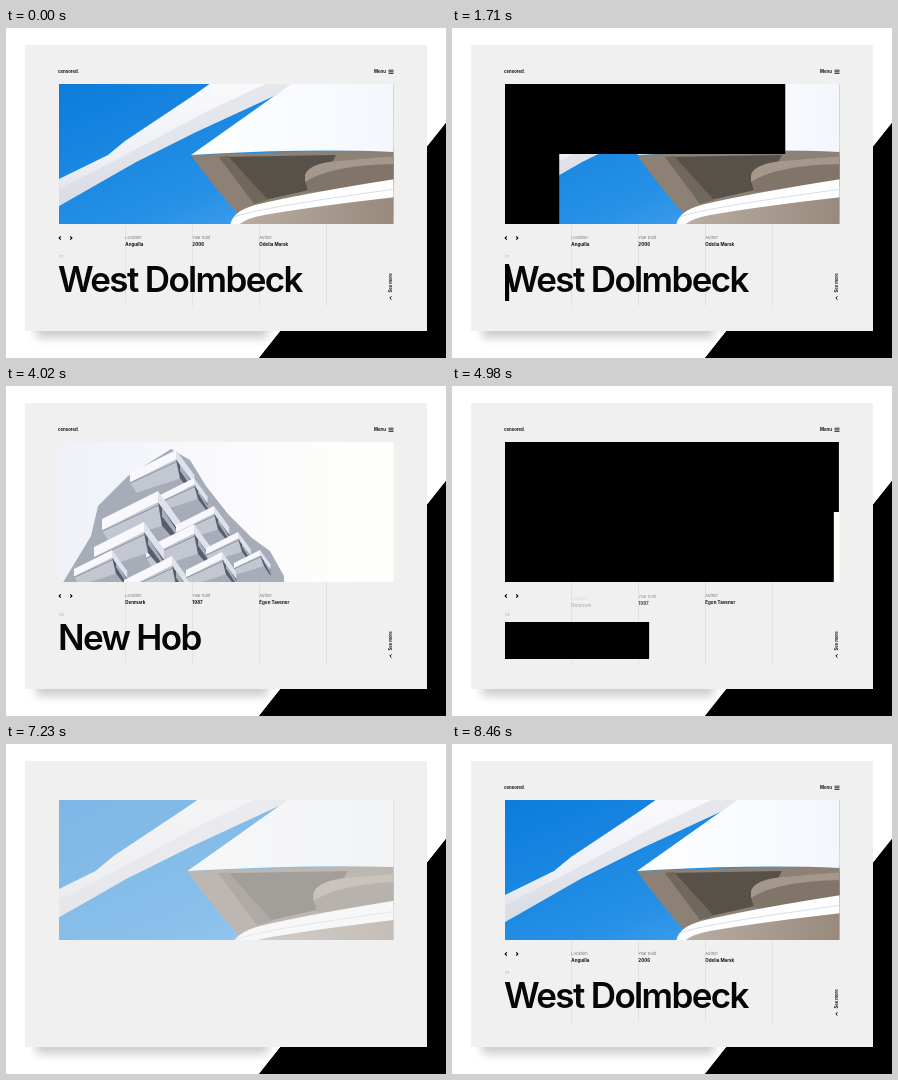
Animation, 440 px wide and 330 px high, one loop 8.49 s. Source, as an HTML page:

```html
<!DOCTYPE html>
<html lang="en">
<head>
<meta charset="utf-8">
<style>
  html, body { margin: 0; width: 100%; height: 100%; overflow: hidden; background: #fff; }
  svg { display: block; width: 440px; height: 330px; font-family: Inter, "Liberation Sans", sans-serif; }
  .title { font-size: 35px; font-weight: 600; letter-spacing: -1.65px; fill: #070707; }
  .strong { font-size: 4.5px; font-weight: 700; fill: #111; }
  .label { font-size: 4px; fill: #777; }
</style>
</head>
<body>
<svg viewBox="0 0 440 330">
  <defs>
    <linearGradient id="sky" x1="0" x2="1" y1="0" y2="1">
      <stop stop-color="#0c7cdb"/><stop offset=".6" stop-color="#2590e6"/><stop offset="1" stop-color="#58aaf0"/>
    </linearGradient>
    <linearGradient id="beam" x1="0" x2=".25" y1="0" y2="1">
      <stop stop-color="#fff"/><stop offset=".6" stop-color="#eff0f5"/><stop offset="1" stop-color="#d3d6df"/>
    </linearGradient>
    <linearGradient id="roof" x1="0" x2="1">
      <stop stop-color="#fff"/><stop offset="1" stop-color="#f3f7fd"/>
    </linearGradient>
    <linearGradient id="concrete" x1="0" x2="1">
      <stop stop-color="#b9aea3"/><stop offset="1" stop-color="#98897c"/>
    </linearGradient>
    <linearGradient id="haze" x1="0" x2="1">
      <stop stop-color="#eff1f8"/><stop offset=".5" stop-color="#fafafd"/><stop offset="1" stop-color="#fffffa"/>
    </linearGradient>
    <linearGradient id="pale" x1="0" x2="1" y1="0" y2="1">
      <stop stop-color="#b9dbef"/><stop offset="1" stop-color="#dbedf6"/>
    </linearGradient>
    <linearGradient id="shell" x1="0" x2="1">
      <stop stop-color="#c7d3df"/><stop offset=".5" stop-color="#e6eaf0"/><stop offset="1" stop-color="#eef1f4"/>
    </linearGradient>
    <filter id="blur" x="-10%" y="-10%" width="120%" height="120%"><feGaussianBlur stdDeviation="5"/></filter>
    <clipPath id="clipTop"><rect x="53" y="56" width="334.5" height="70"/></clipPath>
    <clipPath id="clipBottom"><rect x="53" y="126" width="334.5" height="70"/></clipPath>

    <g id="photo0">
      <rect x="53" y="56" width="335" height="140" fill="url(#sky)"/>
      <path d="M30 162L53 151 102 127 119 113 188 67 212 50H296L268 68 190 104 130 134 53 178 30 190Z" fill="url(#beam)"/>
      <path d="M53 161L108 133 200 84 272 50H296L268 68 190 104 130 134 53 178Z" fill="#d8dbe4" opacity=".55"/>
      <path d="M185 127L390 121V190H236Q208 160 185 127Z" fill="#8d8074"/>
      <path d="M213 129L330 127 312 160 250 174Z" fill="#575149"/>
      <path d="M213 129L222 128 262 172 248 176Z" fill="#70675d"/>
      <path d="M299 152Q299 136 330 133L390 128V158L302 164Z" fill="#81756a"/>
      <path d="M299 147Q302 136 330 133L390 128V136Q325 137 299 154Z" fill="#a4988d"/>
      <path d="M185 127L288 54H390V124Q300 120 185 127Z" fill="url(#roof)"/>
      <path d="M224 200Q224 184 249 177 300 165 390 151V200Z" fill="#fff"/>
      <path d="M230 200Q236 191 258 187 310 178 390 169V200Z" fill="url(#concrete)"/>
      <path d="M228 189Q250 180 390 161" fill="none" stroke="#d9dde4" stroke-width="1"/>
    </g>
    <g id="photo1">
      <rect x="53" y="56" width="335" height="140" fill="url(#haze)"/>
      <path d="M56 198L85 150 92 120 122 90 165 63 184 74 200 100 222 128 246 152 264 165 278 190V198Z" fill="#a7acb9"/>
      <g id="tower"></g>
    </g>
    <g id="photo2">
      <rect x="53" y="56" width="335" height="140" fill="url(#pale)"/>
      <ellipse cx="145" cy="225" rx="148" ry="131" fill="url(#shell)"/>
      <g id="dome"></g>
    </g>
  </defs>

  <path d="M440 95V330H253Z"/>
  <g>
    <path d="M0 303H274L253 330H0Z" fill="#fff"/>
    <rect x="30" y="40" width="232" height="270" fill="#000" opacity=".2" filter="url(#blur)"/>
    <path d="M440 95V330H253Z"/>
  </g>
  <rect x="0" y="0" width="19" height="330" fill="#fff"/>
  <rect x="19" y="17" width="402" height="286" fill="#f0f0f0"/>

  <g id="photo">
    <g clip-path="url(#clipTop)"><use id="top"/></g>
    <g clip-path="url(#clipBottom)"><use id="bottom"/></g>
  </g>
  <g id="grid"><path d="M119.5 196V278M186.5 196V278M253.5 196V278M320.5 196V278" stroke="#e2e2e2"/></g>
  <g id="header">
    <text class="strong" x="52" y="45" style="font-size:4.3px">censored.</text>
    <text class="strong" x="368" y="45" style="font-size:4.3px">Menu</text>
    <path d="M382.5 42.2h5M382.5 43.8h5M382.5 45.4h5" stroke="#222" stroke-width=".9"/>
  </g>
  <g id="nav"><path d="M54.8 208.3l-1.7 1.7 1.7 1.7M64.2 208.3l1.7 1.7-1.7 1.7" fill="none" stroke="#000" stroke-width="1.1"/></g>
  <g id="more">
    <text class="strong" transform="translate(386 264.5) rotate(-90)" style="font-size:4.2px">See more</text>
    <path d="M385.5 268.3l-1.7 1.7 1.7 1.7" fill="none" stroke="#000"/>
  </g>
  <g id="meta"></g>
  <text id="number" class="label" x="53" y="230" style="fill:#aaa"></text>
  <text id="title" class="title" x="52" y="263.5"></text>
  <rect id="topBlock" y="56" height="70"/>
  <rect id="bottomBlock" y="126" height="70"/>
  <rect id="titleBlock" y="236" height="37"/>
</svg>
<script>
const LOOP = 8490, SHIFT = 3010, WIPE = 800, BLANK = 7000, INTRO = 7110;
const slides = [
  { title: "West Dolmbeck", meta: ["Anguilla", "2006", "Odelia Marsk"] },
  { title: "New Hob", meta: ["Denmark", "1987", "Egon Tavener"] },
  { title: "West Tilby", meta: ["Saint Martin", "2001", "Walter Dunsby"] }
];
const blockWidths = [243, 172];
const $ = id => document.getElementById(id);
const clamp = x => Math.min(1, Math.max(0, x));
const out = x => 1 - (1 - clamp(x)) ** 2;
const smooth = x => { x = clamp(x); return x * x * (3 - 2 * x); };
const expo = x => x <= 0 ? 0 : x >= 1 ? 1 : x < .5 ? 2 ** (20 * x - 10) / 2 : 1 - 2 ** (10 - 20 * x) / 2;

function poly(points, fill) {
  return `<polygon points="${points.map(p => p.join()).join(" ")}" fill="${fill}"/>`;
}

// A cantilevered balcony seen from below, with its near corner at x, y.
function balcony([x, y, w]) {
  const left = [x - w, y + w * .5], right = [x + w * .4, y + w * .55], h = w * .2;
  const down = ([px, py], d) => [px, py + d];
  const near = [x, y];
  return poly([down(left, h), down(near, h), [x + 4, y + w * .62], [x - w * .86, y + w * .93]], "#c3c7d1")
    + poly([down(near, h), down(right, h), down(right, h * 2.2), [x + 4, y + w * .62]], "#565d6d")
    + poly([[x + 4, y + w * .3], down(right, h * 1.3), down(right, h * 1.7), [x + 4, y + w * .45]], "#a9b0bd")
    + poly([left, near, down(near, h), down(left, h)], "#f8f8fc")
    + poly([near, right, down(right, h), down(near, h)], "#dfe2ea")
    + `<path d="M${x - w} ${y + w * .72}L${x + 2} ${y + w * .24}" stroke="#7d8494" stroke-width=".8"/>`;
}
$("tower").innerHTML = [
  [170, 64, 46], [188, 92, 34], [152, 105, 56], [208, 120, 38], [188, 138, 48],
  [138, 136, 50], [232, 146, 32], [106, 164, 38], [166, 170, 48], [216, 166, 36], [254, 164, 26]
].map(balcony).join("");

function onDome(lon, lat) {
  return [145 + 148 * Math.cos(lat) * Math.sin(lon), 225 - 131 * Math.sin(lat)];
}
function drawDome() {
  const step = .36, rise = .24;
  let lines = "", holes = "";
  for (let c = -9; c <= 9; c++) {
    for (const side of [-1, 1]) {
      let pen = "M";
      for (let lat = .1; lat < 1.2; lat += .06) {
        const lon = c * step + side * lat * step / 2 / rise;
        if (Math.abs(lon) > 1.5) { pen = "M"; continue; }
        lines += pen + onDome(lon, lat).map(n => n.toFixed(1));
        pen = "L";
      }
    }
    for (let k = 1; k < 5; k++) {
      const lat = k * rise, lon = (c + .5 + k / 2) * step;
      if (Math.abs(lon) > 1.4) continue;
      const [x, y] = onDome(lon, lat);
      const rx = 13.5 * Math.cos(lon) * Math.sqrt(Math.cos(lat)), ry = 11 * Math.sqrt(Math.cos(lat));
      holes += `<ellipse cx="${x}" cy="${y}" rx="${rx}" ry="${ry}" fill="#f5f7f9" stroke="#b8c1ca" stroke-width=".8"/>`
        + `<ellipse cx="${x + 1}" cy="${y + 1}" rx="${rx * .72}" ry="${ry * .72}" fill="#b5c3ce"/>`
        + `<ellipse cx="${x + 1.5}" cy="${y + 2}" rx="${rx * .45}" ry="${ry * .45}" fill="#d3dfe7"/>`;
    }
  }
  $("dome").innerHTML = `<path d="${lines}" fill="none" stroke="#34393f" stroke-width="1.3"/>` + holes;
}
drawDome();

$("meta").innerHTML = ["Location", "Year built", "Author"].map((name, i) =>
  `<g><text class="label" x="${119.3 + 67 * i}" y="211">${name}</text>` +
  `<text class="strong" x="${119.3 + 67 * i}" y="218"></text></g>`).join("");
const columns = [...$("meta").children];

function place(el, alpha, dx = 0, dy = 0) {
  el.setAttribute("opacity", alpha);
  el.setAttribute("transform", `translate(${dx} ${dy})`);
}
function wipe(id, width, time, enter, exit) {
  const head = expo((time - enter) / WIPE), tail = expo((time - exit) / WIPE);
  $(id).setAttribute("x", 53 + width * tail);
  $(id).setAttribute("width", width * Math.max(0, head - tail));
}

function render(t) {
  const turn = t < 4250 ? 0 : 1;
  const time = t - turn * SHIFT;
  const intro = t >= BLANK;
  const slideAt = swap => intro ? 0 : time >= swap ? turn + 1 : turn;
  const shown = start => intro ? out((t - start) / 450) : 1 - smooth((t - 6530) / 400);

  $("top").setAttribute("href", "#photo" + slideAt(2060));
  $("bottom").setAttribute("href", "#photo" + slideAt(2194));
  $("photo").setAttribute("opacity", intro ? out((t - INTRO) / 410) : shown());
  const zoom = intro ? 1.11 - .11 * smooth((t - INTRO) / 1150) : 1;
  for (const id of ["top", "bottom"])
    $(id).setAttribute("transform", `translate(220 126) scale(${zoom}) translate(-220 -126)`);

  wipe("topBlock", 334.5, intro ? 0 : time, 1246, 2060);
  wipe("bottomBlock", 334.5, intro ? 0 : time, 1376, 2212);
  wipe("titleBlock", blockWidths[turn], intro ? 0 : time, 1506, 2306);

  const slideIn = (id, start, dx, dy) => {
    const a = shown(start), off = intro ? 1 - a : 0;
    place($(id), a, dx * off, dy * off);
  };
  slideIn("grid", 7450, 0, 0);
  slideIn("header", 7500, 0, -4);
  slideIn("nav", 7500, -6, 0);
  slideIn("more", 7600, 0, 4);
  slideIn("title", 7650, 0, 8);

  const titleSlide = slideAt(2306);
  $("title").textContent = slides[titleSlide].title;

  columns.forEach((column, i) => {
    const leave = 1800 + 90 * i, arrive = 2450 + 115 * i;
    const index = slideAt(arrive);
    column.lastChild.textContent = slides[index].meta[i];
    let alpha = shown(7550 + 100 * i), dy = intro ? -6 * (1 - alpha) : 0;
    if (!intro) {
      const gone = smooth((time - leave) / 250), back = out((time - arrive) / 250);
      alpha *= time < arrive ? 1 - gone : back;
      dy = time < arrive ? 4 * gone : -6 * (1 - back);
    }
    place(column, alpha, 0, dy);
  });

  const numberSlide = slideAt(2400);
  $("number").textContent = "0" + (numberSlide + 1);
  const dip = intro ? 1 : clamp(Math.abs(time - 2400) / 200);
  place($("number"), shown(7600) * dip);
}

const start = performance.now();
function tick() {
  render((performance.now() - start) % LOOP);
  requestAnimationFrame(tick);
}
tick();
</script>
</body>
</html>
```
